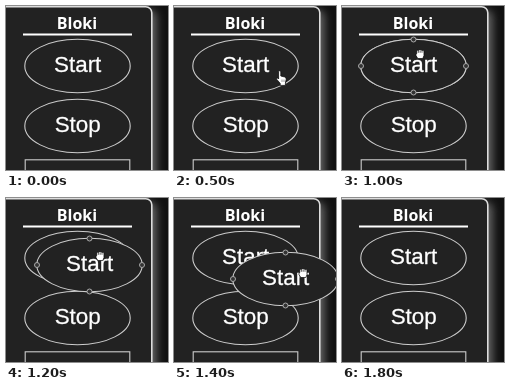
Animation, 162 px wide and 164 px high, one loop 2100 ms. Source, as an HTML page:

```html
<!DOCTYPE html>
<html lang="pl">
<head>
<meta charset="utf-8">
<title>Bloki</title>
<style>
  html, body { margin: 0; width: 100%; height: 100%; overflow: hidden; background: #111; }
  svg { display: block; width: 100vw; height: 100vh; }
  text { fill: #fff; stroke: #fff; stroke-width: .3; text-anchor: middle; }
  .title { font: bold 16px "Open Sans", "Noto Sans", sans-serif; stroke: none; }
  .label { font: 22.4px "Liberation Sans", Arial, sans-serif; }
  .shape { fill: #222; stroke: #ccc; stroke-width: 1.1; }
  .handle { fill: #333; stroke: #aaa; stroke-width: 1; }
  .panel { fill: #222; stroke: #ddd; stroke-width: 1.6; filter: drop-shadow(4px 4px 4px #666); }
  .hand { fill: #fff; stroke: #111; stroke-width: .8; stroke-linejoin: round; }

  .pointer, .drag, .grip { visibility: hidden; animation: 2100ms step-end infinite; }
  .pointer { animation-name: approach; }
  .drag { animation-name: drag; }
  .grip { animation-name: grip; }

  /* One step per 100 ms */
  @keyframes approach {
    0% { visibility: hidden; }
    14.28% { visibility: visible; transform: translate(147px, 92px); }
    19.04% { visibility: visible; transform: translate(123px, 77px); }
    23.8% { visibility: visible; transform: translate(102px, 64px); }
    28.57% { visibility: visible; transform: translate(83px, 53px); }
    33.33% { visibility: visible; transform: translate(73px, 48px); }
    47.61%, 100% { visibility: hidden; }
  }
  @keyframes drag {
    0% { visibility: hidden; }
    47.61% { visibility: visible; transform: translate(0, 0); }
    52.38% { visibility: visible; transform: translate(4px, 2px); }
    57.14% { visibility: visible; transform: translate(12px, 7px); }
    61.9% { visibility: visible; transform: translate(25px, 14px); }
    66.66% { visibility: visible; transform: translate(40px, 21px); }
    71.42% { visibility: visible; transform: translate(64px, 30px); }
    76.19% { visibility: visible; transform: translate(93px, 44px); }
    80.95% { visibility: visible; transform: translate(124px, 54px); }
    85.71%, 100% { visibility: hidden; }
  }
  @keyframes grip {
    0% { visibility: hidden; }
    47.61% { visibility: visible; transform: translate(78px, 48px); }
    52.38% { visibility: visible; transform: translate(84px, 52px); }
    57.14% { visibility: visible; transform: translate(94px, 58px); }
    61.9% { visibility: visible; transform: translate(108px, 66px); }
    66.66% { visibility: visible; transform: translate(129px, 75px); }
    71.42% { visibility: visible; transform: translate(153px, 86px); }
    76.19%, 100% { visibility: hidden; }
  }
</style>
</head>
<body>
<svg viewBox="0 0 162 164" preserveAspectRatio="none">
  <defs>
    <g id="start">
      <ellipse class="shape" cx="71.5" cy="60" rx="52.7" ry="26.7"/>
      <text class="label" x="71.7" y="66">Start</text>
    </g>
  </defs>

  <rect class="panel" x="-20" y=".8" width="165.8" height="200" rx="6"/>
  <text class="title" x="71" y="23">Bloki</text>
  <rect x="17" y="27.5" width="109" height="2" fill="#fff"/>

  <use href="#start"/>
  <ellipse class="shape" cx="71.5" cy="120" rx="52.7" ry="26.7"/>
  <text class="label" x="71.7" y="126">Stop</text>
  <rect class="shape" x="19.2" y="153.8" width="104.6" height="53"/>

  <g class="drag">
    <use href="#start"/>
    <g class="handle">
      <circle cx="71.5" cy="33.5" r="2.5"/>
      <circle cx="124" cy="60" r="2.5"/>
      <circle cx="71.5" cy="86.5" r="2.5"/>
      <circle cx="19" cy="60" r="2.5"/>
    </g>
  </g>

  <g class="pointer">
    <path class="hand" d="M2.6 9V1.6Q3.6 0 4.8 1.6V6L8.8 7Q10.4 7.5 10.2 9.4L9.4 13V15.4H4.2V13.4L.6 9.2Q.2 7.6 1.6 8Z"/>
    <path d="M6 9.5V12M8 9.5V12" stroke="#555" stroke-width=".6"/>
  </g>
  <g class="grip">
    <path class="hand" d="M-3.2-.6V-3Q-2.4-4.4-1.4-3.4Q-.5-5-.0-3.8Q1-5 1.8-3.6Q3.4-4.2 4-2.4V1.6L2.8 4.6H-2.2L-4 1.6Q-4.4-.2-3.2-.6Z"/>
    <path d="M-1.4-3V-1.2M.2-3.2V-1.2M2-3V-1.2" stroke="#222" stroke-width=".7"/>
  </g>
</svg>
</body>
</html>
```
